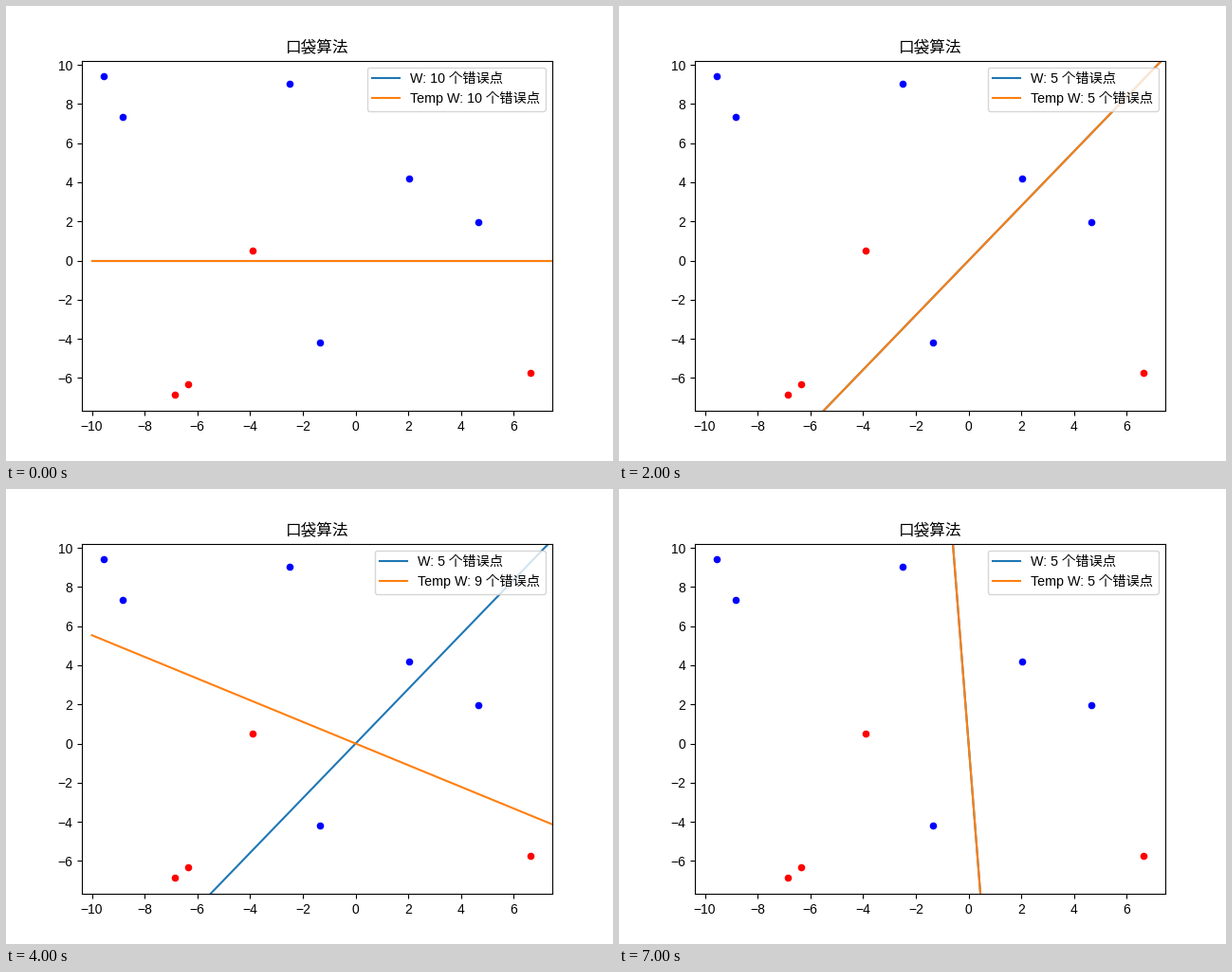
These frames come from a looping animation (640 px wide and 480 px high, 8000 ms). A matplotlib script:

```python
import matplotlib.pyplot as plt
import numpy as np
from matplotlib.animation import FuncAnimation

plt.rcParams["font.family"] = ["Liberation Sans", "Noto Sans CJK JP"]

BLUE = np.array([(-9.57, 9.40), (-8.84, 7.32), (-2.51, 9.02),
                 (2.02, 4.18), (4.66, 1.97), (-1.36, -4.20)])
RED = np.array([(-3.92, 0.50), (6.65, -5.75), (-6.36, -6.33), (-6.86, -6.87)])

# Correction tried in each round, always starting from the pocket weights.
TRIALS = [-RED[1], -BLUE[1], -BLUE[3], RED[3], -BLUE[3], -BLUE[3], BLUE[4]]
X_ENDS = np.array([-10, 10])


def count_errors(weights):
    return np.sum(BLUE @ weights <= 0) + np.sum(RED @ weights >= 0)


def pocket_history():
    """Pocket and trial weights after every round."""
    pocket = np.zeros(2)
    history = [(pocket, pocket)]
    for correction in TRIALS:
        trial = pocket + correction
        if count_errors(trial) <= count_errors(pocket):
            pocket = trial
        history.append((pocket, trial))
    return history


def boundary(weights):
    a, b = weights
    return -a / b * X_ENDS if b else 0 * X_ENDS


fig, ax = plt.subplots(figsize=(6.4, 4.8), dpi=100)
ax.set_title("口袋算法")
for points, color in ((BLUE, "blue"), (RED, "red")):
    ax.scatter(*points.T, s=20, color=color)
ax.set(xlim=ax.get_xlim(), ylim=ax.get_ylim())

names = ("W", "Temp W")
lines = [ax.plot(X_ENDS, 0 * X_ENDS, label=name)[0] for name in names]
legend = ax.legend(loc="upper right", fontsize=10.3, labelspacing=0.42,
                   borderaxespad=0.485)
history = pocket_history()


def update(step):
    for line, text, name, weights in zip(
            lines, legend.get_texts(), names, history[step]):
        line.set_ydata(boundary(weights))
        text.set_text(f"{name}: {count_errors(weights)} 个错误点")
    return [*lines, legend]


animation = FuncAnimation(fig, update, frames=len(history), interval=1000,
                          repeat=True, repeat_delay=0)
plt.show()
```
